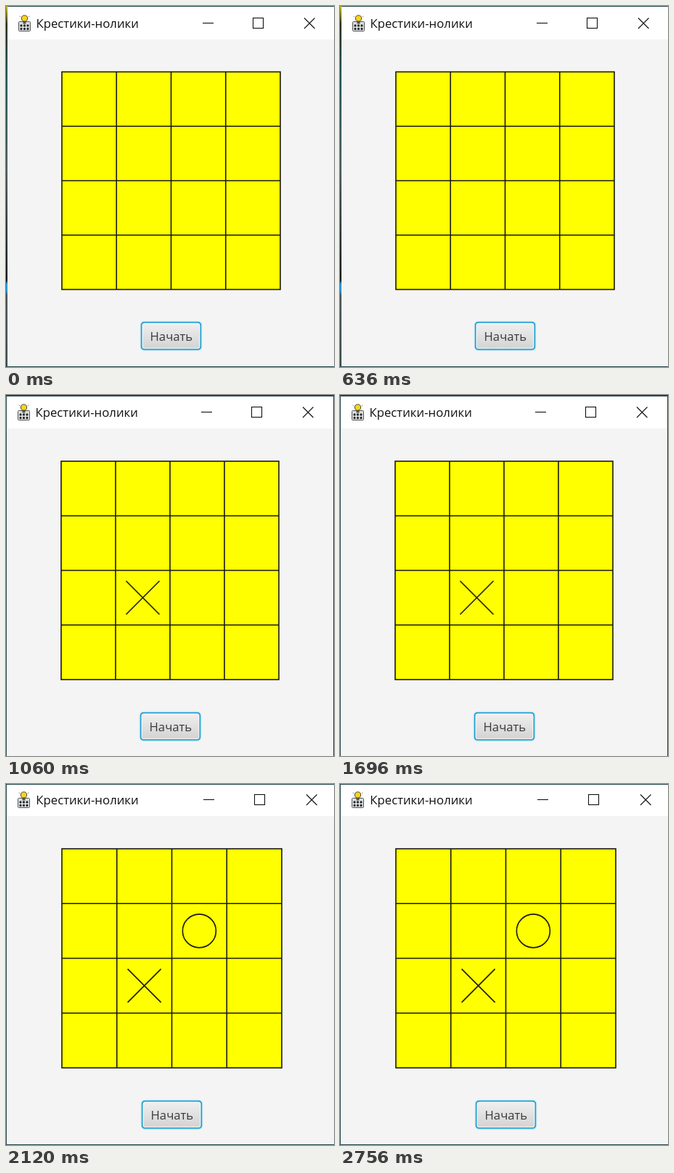
An HTML page that plays this animation: 452 by 496 pixels, repeating every 3180 ms.

```html
<!DOCTYPE html>
<html lang="ru">
<head>
<meta charset="utf-8">
<title>Крестики-нолики</title>
<style>
  html, body { margin: 0; width: 100%; height: 100%; overflow: hidden; background: #f4f4f4; }
  svg { display: block; width: 452px; height: 496px; }
  text { font-family: "Open Sans", "Noto Sans", sans-serif; }
  .title { font-size: 16.8px; fill: #111; }
  .label { font-size: 16.7px; fill: #3a3a3a; }
  .line { fill: none; stroke: #1a1a10; stroke-width: 1.6; }
  .thin { fill: none; stroke: #111; stroke-width: 1.1; }
  .scene { visibility: hidden; animation: show 3180ms step-end infinite; }
  @keyframes show {
    0% { visibility: visible; }
    33.3333%, 100% { visibility: hidden; }
  }
</style>
</head>
<body>
<svg id="stage" viewBox="0 0 452 496">
  <defs>
    <linearGradient id="face" x2="0" y2="1">
      <stop offset="0" stop-color="#f0f0f0"/>
      <stop offset="1" stop-color="#d2d2d2"/>
    </linearGradient>
    <linearGradient id="desk" x2="0" y2="1">
      <stop offset="0" stop-color="#c8b91e"/>
      <stop offset=".05" stop-color="#2b2a1c"/>
      <stop offset=".2" stop-color="#1f5558"/>
      <stop offset=".45" stop-color="#4a5a5a"/>
      <stop offset=".76" stop-color="#15181a"/>
      <stop offset=".77" stop-color="#2795c9"/>
      <stop offset=".79" stop-color="#2795c9"/>
      <stop offset=".8" stop-color="#4a5456"/>
      <stop offset="1" stop-color="#3a4a4c"/>
    </linearGradient>
    <g id="icon">
      <rect x=".5" y="9.5" width="16" height="13" rx="1" fill="#dcdfe2" stroke="#555"/>
      <path d="M6.5 8.5h4v4h-4z" fill="#555"/>
      <circle cx="8.5" cy="5" r="4.1" fill="#f6d51f" stroke="#4d4520"/>
      <path d="M4 14.9h0M8.5 14.9h0M13 14.9h0M4 19.4h0M8.5 19.4h0M13 19.4h0"
        stroke="#222" stroke-width="3.2" stroke-linecap="round"/>
      <path d="M1.5 2l1.5 1M15.5 2l-1.5 1" stroke="#666" stroke-width=".8"/>
    </g>
  </defs>
</svg>
<script>
  const scenes = [
    { left: 2, top: 1, right: 452, bottom: 495, bar: 46, edge: 'url(#desk)',
      icon: 17, title: 41.4, iconY: 12, min: 271, max: 340.5, close: 411, midY: 23.5,
      grid: [77, 90.5, 301, 299], button: [186.5, 434.5], marks: [] },
    { left: 1, top: 2, right: 451, bottom: 496, bar: 46, edge: '#2c4a4d',
      icon: 16, title: 40.4, iconY: 12, min: 269, max: 338.5, close: 409, midY: 23.5,
      grid: [76, 91, 300, 300], button: [185.5, 436.5], marks: ['x'] },
    { left: 1, top: 1, right: 452, bottom: 495, bar: 44, edge: '#2c4a4d',
      icon: 16, title: 41.2, iconY: 10, min: 272, max: 342.5, close: 414, midY: 21.5,
      grid: [77, 89, 303, 301], button: [187.5, 435.5], marks: ['x', 'o'] }
  ];

  const rect = (x, y, w, h, attrs) =>
    `<rect x="${x}" y="${y}" width="${w}" height="${h}" ${attrs}/>`;
  const path = (d, cls) => `<path d="${d}" class="${cls}"/>`;

  function frame(s) {
    return rect(0, 0, 452, 496, 'fill="#24484c"') +
      rect(0, 0, s.left, 496, `fill="${s.edge}"`) +
      rect(s.left, s.top, s.right - s.left, s.bottom - s.top, 'fill="#f4f4f4"') +
      rect(s.left, s.top, s.right - s.left, s.bar - s.top, 'fill="#fff"');
  }

  function titleBar(s) {
    const y = s.midY;
    return `<use href="#icon" x="${s.icon}" y="${s.iconY}"/>` +
      `<text class="title" x="${s.title}" y="${y + 6.7}">Крестики-нолики</text>` +
      path(`M${s.min} ${y}h15`, 'thin') +
      rect(s.max, y - 7, 14, 14, 'class="thin"') +
      path(`M${s.close} ${y - 7}l14.5 14.5m0 -14.5l-14.5 14.5`, 'thin');
  }

  function board([x, y, w, h], marks) {
    const cw = w / 4, ch = h / 4, r = 23;
    let d = '';
    for (let i = 1; i < 4; i++) {
      d += `M${x + cw * i} ${y}v${h}M${x} ${y + ch * i}h${w}`;
    }
    let out = rect(x, y, w, h, 'class="line" style="fill:#ff0"') + path(d, 'line');
    if (marks.includes('x')) {
      const cx = x + cw * 1.5, cy = y + ch * 2.5;
      out += path(`M${cx - r} ${cy - r}l${2 * r} ${2 * r}m0 ${-2 * r}l${-2 * r} ${2 * r}`, 'line');
    }
    if (marks.includes('o')) {
      out += `<circle cx="${x + cw * 2.5}" cy="${y + ch * 1.5}" r="${r}" class="line"/>`;
    }
    return out;
  }

  function button([x, y]) {
    return rect(x - .5, y - .5, 83, 38.5, 'rx="4.5" fill="none" stroke="#b5dfee" stroke-width="2.5"') +
      rect(x + .3, y + .3, 81.4, 36.9, 'rx="3.5" fill="url(#face)" stroke="#1a9fd2" stroke-width="1.7"') +
      rect(x + 1.7, y + 1.7, 78.6, 34.1, 'rx="2.5" fill="none" stroke="#f8f8f8"') +
      `<text class="label" x="${x + 41.4}" y="${y + 25.5}" text-anchor="middle">Начать</text>`;
  }

  const stage = document.getElementById('stage');
  scenes.forEach((s, i) => {
    // a negative delay puts each scene in its own third of the loop
    const delay = (i - scenes.length) * 1060;
    stage.insertAdjacentHTML('beforeend',
      `<g class="scene" style="animation-delay:${delay}ms">` +
      frame(s) + titleBar(s) + board(s.grid, s.marks) + button(s.button) + '</g>');
  });
</script>
</body>
</html>
```
